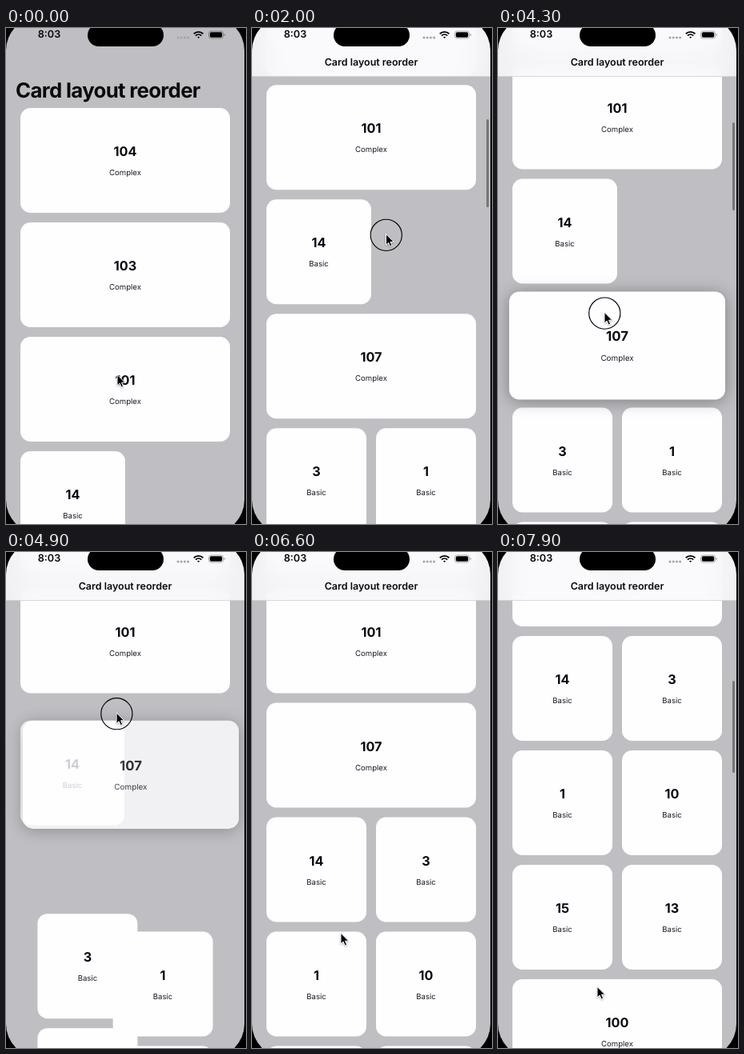
Recreate the animation shown at these times as an HTML page. Size 300 by 620 pixels, loop 8000 ms.

```html
<!DOCTYPE html>
<html lang="en">
<head>
<meta charset="utf-8">
<title>Card layout reorder</title>
<style>
  html, body { margin: 0; width: 100%; height: 100%; overflow: hidden; background: #000; }
  #stage { position: relative; width: 300px; height: 620px; overflow: hidden; background: #bfbec3;
    color: #0a0a0a; font-family: Inter, sans-serif; text-rendering: geometricPrecision; }
  #stage > *, .card { position: absolute; box-sizing: border-box; }
  #list { left: 0; top: 0; }
  .card { left: 0; top: 0; height: 131px; padding-top: 42px; border-radius: 12.5px; background: #fefdff;
    text-align: center; }
  .card b { display: block; font-size: 16.2px; line-height: 24px; }
  .card span { display: block; margin-top: 8px; font-size: 9.6px; line-height: 15px; color: #1c1c1c; }
  #heading { position: absolute; left: 12px; top: 64px; white-space: nowrap;
    font: 700 25.8px/30px Inter, sans-serif; letter-spacing: -.026em; }
  #bar { left: 0; top: 0; width: 298px; height: 61px; padding-top: 34px; text-align: center;
    font: 600 12.5px/20px Inter, sans-serif;
    background: rgba(250, 250, 252, .85); backdrop-filter: blur(14px); border-bottom: 1px solid rgba(0, 0, 0, .13); }
  #thumb { left: 293.4px; width: 2.4px; border-radius: 2px; background: rgba(0, 0, 0, .38); }
  #clock { left: 24px; top: 1px; width: 60px; text-align: center; font: 600 12.7px/16px Inter, sans-serif; }
  #island { left: 101.5px; top: -5px; width: 95px; height: 28px; border-radius: 14px; background: #000; }
  #frame { left: 0; top: -14px; width: 298px; height: 646px; border-radius: 42px; box-shadow: 0 0 0 60px #000; }
  #overlay { left: 0; top: 0; }
</style>
</head>
<body>
<div id="stage">
  <div id="list"><div id="heading">Card layout reorder</div></div>
  <div id="thumb"></div>
  <div id="bar">Card layout reorder</div>
  <div id="clock">8:03</div>
  <div id="island"></div>
  <div id="frame"></div>
  <svg id="overlay" width="300" height="620">
    <path d="M215 12h13" stroke="#a4a3a7" stroke-width="3" stroke-linecap="round" stroke-dasharray="0 4.2"/>
    <g fill="none" stroke="#000" stroke-width="1.9">
      <path d="M234.8 7.2a8.3 8.3 0 0 1 11.6 0M237 9.6a5.2 5.2 0 0 1 7.2 0"/>
      <path d="M240.6 13l-1.5-1.6a2.2 2.2 0 0 1 3 0z" fill="#000" stroke="none"/>
    </g>
    <rect x="253.5" y="4" width="18" height="9" rx="2.8" fill="none" stroke="#000" stroke-opacity=".4" stroke-width=".8"/>
    <rect x="254.8" y="5.3" width="15.4" height="6.4" rx="1.7"/>
    <path d="M272.8 7v3q1-.4 1-1.5t-1-1.5z" opacity=".45"/>
    <g id="pointer">
      <circle id="touch" cx=".3" cy="1.6" r="19.6" fill="none" stroke="#000" stroke-width="1.15"/>
      <path d="M0 .4v13.6l3.1-2.9 2.1 4.9 2.4-1-2.1-4.8h4.3z" stroke="#fff"
        style="filter: drop-shadow(0 1px 1px rgba(0,0,0,.3))"/>
    </g>
  </svg>
</div>
<script>
const LOOP = 8000, STEP = 100;
const LEFT = 18, WIDTH = 262, GAP = 12, HEIGHT = 131, TOP = 100;
const PAIR = (WIDTH - GAP) / 2, ROW = HEIGHT + GAP;
const DRAGGED = 107;
const before = [104, 103, 101, 14, DRAGGED, 3, 1, 10, 15, 13, 100];
const after = before.filter(n => n !== DRAGGED);
after.splice(3, 0, DRAGGED);

const $ = id => document.getElementById(id);
const clamp = v => Math.min(1, Math.max(0, v));
const mix = (a, b, k) => a + (b - a) * k;
const isComplex = n => n >= 100;

// Eased 0 to 1 between two times.
function ramp(t, start, end) {
  const k = clamp((t - start) / (end - start));
  return k * k * (3 - 2 * k);
}

// Complex cards take a full row; neighbouring basic cards share one.
function layout(order) {
  const slots = {};
  let y = TOP;
  for (let i = 0; i < order.length; i++, y += ROW) {
    const n = order[i], next = order[i + 1];
    if (isComplex(n)) slots[n] = { x: LEFT, y, w: WIDTH };
    else if (next && !isComplex(next)) {
      slots[n] = { x: LEFT, y, w: PAIR };
      slots[next] = { x: LEFT + PAIR + GAP, y, w: PAIR };
      i++;
    } else slots[n] = { x: LEFT, y, w: WIDTH / 2 };
  }
  return slots;
}

const from = layout(before), to = layout(after);
const cards = before.map(n => {
  const el = document.createElement('div');
  el.className = 'card';
  el.innerHTML = `<b>${n}</b><span>${isComplex(n) ? 'Complex' : 'Basic'}</span>`;
  if (n === DRAGGED) el.style.zIndex = 1;
  $('list').append(el);
  return { n, el };
});

// Pointer moves: start, end, and the point reached.
const moves = [
  [500, 900, 172, 262],
  [1300, 1400, 170, 426], [1400, 2200, 167, 226],
  [3800, 4000, 133, 355], [4600, 5000, 139, 172], [5000, 5300, 134, 225],
  [5500, 6600, 111, 476], [6600, 7300, 128, 262], [7400, 7900, 124, 543],
];
const presses = [[300, 900], [1400, 3000], [4000, 5500], [6700, 7200]];

function pointerAt(t) {
  let x = 139, y = 433;
  for (const [start, end, toX, toY] of moves) {
    const k = ramp(t, start, end);
    x = mix(x, toX, k);
    y = mix(y, toY, k);
  }
  return [x, y];
}

const scrollAt = t => 136.5 * ramp(t, 500, 900) + 204 * ramp(t, 1300, 2200) + 226.5 * ramp(t, 6600, 7300);

// The held card rises one row, swinging past its slot before it settles.
function heldCard(t) {
  const swing = Math.sin(Math.PI * clamp((t - 4600) / 900));
  return {
    dx: 8 * swing,
    dy: -ROW * ramp(t, 4600, 5100) - 40 * swing ** 3,
    lift: ramp(t, 4000, 4300) - ramp(t, 5500, 6100),
    opacity: 1 - .2 * (ramp(t, 4600, 4900) - ramp(t, 5300, 5700)),
  };
}

function place(style, x, y, w, scale = 1) {
  style.width = w + 'px';
  style.transform = `translate(${x}px, ${y}px) scale(${scale})`;
}

function draw(t) {
  const scroll = scrollAt(t), reflow = ramp(t, 4800, 5200);
  $('list').style.transform = `translateY(${-scroll}px)`;
  $('bar').style.opacity = clamp((scroll - 15) / 35);

  for (const { n, el: { style } } of cards) {
    const a = from[n], b = to[n];
    if (n === DRAGGED) {
      const { dx, dy, lift, opacity } = heldCard(t);
      place(style, a.x + dx, a.y + dy, a.w, 1 + .031 * lift);
      style.boxShadow = `0 2px 20px rgba(0, 0, 0, ${.34 * lift})`;
      style.opacity = opacity;
    } else place(style, mix(a.x, b.x, reflow), mix(a.y, b.y, reflow), mix(a.w, b.w, reflow));
  }

  const thumb = $('thumb').style;
  thumb.top = 60 + scroll * mix(.17, .178, reflow) + 'px';
  thumb.height = mix(110, 115, reflow) + 'px';
  thumb.opacity = ramp(t, 500, 600) - ramp(t, 4600, 4900) + ramp(t, 6600, 6700);

  $('pointer').setAttribute('transform', `translate(${pointerAt(t)})`);
  $('touch').style.opacity = presses.some(([down, up]) => t >= down && t < up) ? 1 : 0;
}

const start = performance.now();
function tick() {
  const t = (performance.now() - start) % LOOP;
  draw(Math.floor(t / STEP) * STEP);
  requestAnimationFrame(tick);
}
tick();
</script>
</body>
</html>
```
